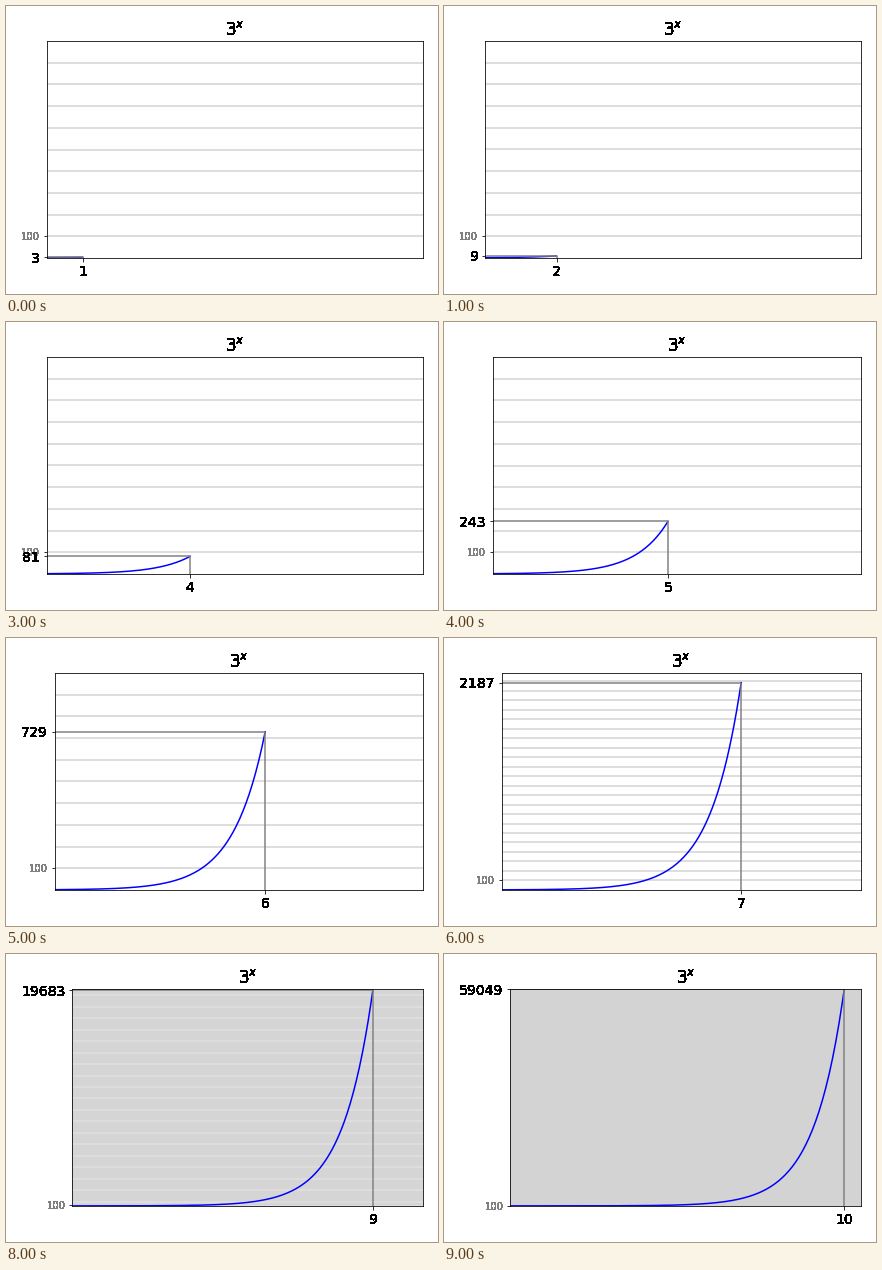
Write a matplotlib script that moves like this. It is 432 px wide and 288 px high and loops after 10000 ms.

```python
import numpy as np
import matplotlib.pyplot as plt
from matplotlib.animation import FuncAnimation

BASE = 3
STEPS = 10
STEP_MS = 1000

plt.rcParams.update({"font.family": "DejaVu Sans", "font.size": 14})

fig, ax = plt.subplots(figsize=(6, 4), dpi=72)


def harden(image, dpi):
    """Turn soft text edges into solid pixels."""
    solid = image.copy()
    mask = image[..., 3] > 0.06
    core = image[..., 3] == image[..., 3].max()
    solid[mask, :3] = image[core][0, :3]
    solid[..., 3] = mask
    return solid, 0, 0


def reset():
    fig.subplots_adjust(left=0.125, right=0.9, bottom=0.11, top=0.88)
    return []


def draw(step):
    x = step + 1
    y = BASE ** x
    top = max(1000, y + 100)
    ax.clear()

    ax.hlines(np.arange(100, top, 100), 0, 10.5, color="lightgrey", lw=1.5)
    xs = np.linspace(0, x, 200)
    ax.plot(xs, BASE ** xs, color="blue", lw=1.5)
    ax.hlines(y, 0, x, color="grey", lw=1.5)
    ax.vlines(x, 0, y, color="grey", lw=1.5)

    ax.set_xlim(0, 10.5)
    ax.set_ylim(0, top)
    ax.set_xticks([x], [str(x)])
    ax.set_yticks([100, y], ["100", str(y)])
    title = ax.set_title(f"${BASE}^x$")

    labels = ax.get_xticklabels() + ax.get_yticklabels()
    ax.get_yticklabels()[0].set(fontsize=10, color="grey")
    for text in [title, *labels]:
        text.set_agg_filter(harden)
    fig.tight_layout()
    return []


anim = FuncAnimation(fig, draw, frames=STEPS, init_func=reset,
                     interval=STEP_MS, repeat=True, repeat_delay=0)
plt.show()
```
